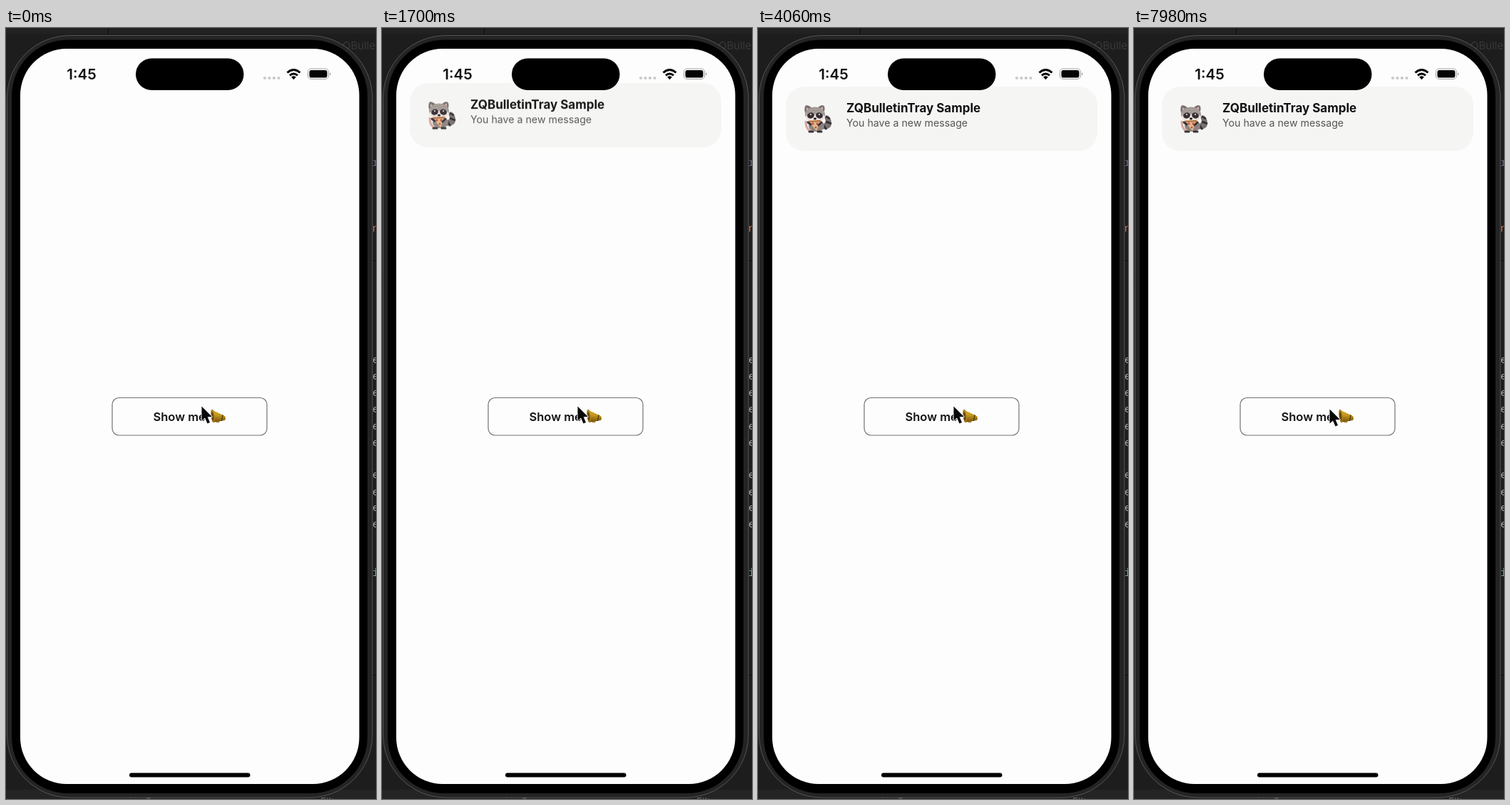
Recreate the animation shown at these times as an HTML page. Size 519x1079 px, loop 8000 ms.

```html
<!DOCTYPE html>
<html lang="en">
<head>
<meta charset="utf-8">
<title>Banner notification</title>
<style>
  html, body { margin: 0; width: 100%; height: 100%; overflow: hidden; background: #1d1d1d; }
  svg { display: block; width: 100vw; height: 100vh; }
  text { font-family: Inter, Roboto, sans-serif; }
  .code text { font: 15px "Noto Sans Mono", "DejaVu Sans Mono", monospace; }
  .bold { font-weight: 600; fill: #111; }

  #banner { animation: drop 8s infinite; }
  @keyframes drop {
    0%, 16.06% {
      transform: translateY(-146px); opacity: 0;
      animation-timing-function: cubic-bezier(.2, .4, .2, 1);
    }
    23.41%, 100% { transform: none; opacity: 1; }
  }

  #cursor { animation: nudge 8s infinite; }
  @keyframes nudge {
    0%, 96% { transform: none; animation-timing-function: ease-in-out; }
    99.5%, 100% { transform: translateY(4px); }
  }
</style>
</head>
<body>
<svg viewBox="0 0 519 1079" preserveAspectRatio="none">
  <defs>
    <clipPath id="screen"><rect x="20" y="29" width="475.500" height="1029" rx="65"/></clipPath>
    <linearGradient id="gold" x1="0" y1="0" x2="0" y2="1">
      <stop offset="0" stop-color="#d9b435"/>
      <stop offset=".45" stop-color="#c3951c"/>
      <stop offset="1" stop-color="#6e4d0c"/>
    </linearGradient>
  </defs>

  <!-- desktop behind the phone -->
  <rect width="519" height="1079" fill="#1d1d1d"/>
  <rect width="519" height="8" fill="#222"/>
  <path d="M143.500 0V9M0 128.500H3M0 352.500H3M514 325.500H519M514 905.500H519" stroke="#0c0c0c"/>
  <rect y="1066" width="519" height="13" fill="#242424"/>
  <text x="472" y="30" font-size="15" fill="#383838">QBulle</text>
  <g class="code" id="code"></g>
  <text x="156" y="1087" font-size="13" fill="#777">swipe 0</text>
  <text x="441" y="1088" font-size="14" fill="#666">Filter</text>

  <!-- phone body -->
  <rect x="1.500" y="10.500" width="512.500" height="1066.500" rx="88" fill="#242424" stroke="#555"/>
  <rect x="8" y="16.500" width="499" height="1054.500" rx="79" fill="#000"/>
  <rect x="20" y="29" width="475.500" height="1029" rx="65" fill="#fdfdfd"/>

  <g clip-path="url(#screen)">
    <g id="banner">
      <rect x="39" y="82" width="437" height="90" rx="26" fill="#f5f5f4"/>

      <!-- raccoon with a slice of pizza -->
      <path d="M88 141Q103 144 103 133Q102 123 96 122Q92 124 95 130Q95 135 87 134Z" fill="#77706f"/>
      <path d="M95 124l6 3M95 131l8 3M92 136l4 6" stroke="#302c30" stroke-width="2.500"/>
      <ellipse cx="82" cy="137" rx="11" ry="8" fill="#8d8380"/>
      <path d="M66 119Q64 109 68 108Q74 109 77 114Z" fill="#77706f"/>
      <path d="M93 117Q95 108 90 108Q85 109 82 114Z" fill="#77706f"/>
      <path d="M68 115l0-4 4 3ZM91 114l0-4-4 3Z" fill="#e0b3a8"/>
      <ellipse cx="80" cy="121" rx="14" ry="10.500" fill="#a39a96"/>
      <path d="M66 124Q74 118 80 121Q87 118 94 124Q90 132 80 131Q70 132 66 124Z" fill="#eee3dc"/>
      <ellipse cx="74" cy="122.500" rx="5" ry="4" fill="#352f34" transform="rotate(-20 74 122.500)"/>
      <ellipse cx="86" cy="122.500" rx="5" ry="4" fill="#352f34" transform="rotate(20 86 122.500)"/>
      <g fill="#fff"><circle cx="74" cy="121" r="1"/><circle cx="86" cy="121" r="1"/></g>
      <ellipse cx="80" cy="127" rx="2" ry="1.400" fill="#19171a"/>
      <path d="M71 131L88 130L82 144Z" fill="#e9b98b"/>
      <path d="M71 131L88 130" stroke="#b77746" stroke-width="2.500"/>
      <g fill="#bd584e"><circle cx="77" cy="134" r="1.700"/><circle cx="83" cy="134" r="1.700"/><circle cx="81" cy="139" r="1.500"/></g>
      <path d="M67 130Q67 143 75 144" fill="none" stroke="#d5a89c" stroke-width="3"/>
      <path d="M70 132l4 3M89 132l-4 4M72 145h5M84 145h5" stroke="#3a3336" stroke-width="3" stroke-linecap="round"/>

      <text class="bold" x="124" y="118" font-size="17" style="font-weight:700">ZQBulletinTray Sample</text>
      <text x="124" y="138.300" font-size="14.200" fill="#555">You have a new message</text>
    </g>

    <!-- status bar -->
    <text class="bold" x="106" y="72" font-size="20.500" text-anchor="middle">1:45</text>
    <path d="M363 70h20" stroke="#c8c8c8" stroke-width="4.200" stroke-linecap="round" stroke-dasharray="0 6.500"/>
    <g fill="none" stroke="#050505" stroke-width="2.900">
      <path d="M394.500 62.500Q403.500 54.500 412.500 62.500"/>
      <path d="M398 66.300Q403.500 61.500 409 66.300"/>
    </g>
    <path d="M400.200 68.700Q403.500 66 406.800 68.700L403.500 72.300Z" fill="#050505"/>
    <rect x="423.500" y="57" width="29" height="14.500" rx="4.500" fill="none" stroke="#a3a3a3"/>
    <rect x="425.500" y="59" width="25" height="10.500" rx="2.800" fill="#050505"/>
    <path d="M454 62Q457 64.300 454 66.600Z" fill="#a3a3a3"/>
  </g>
  <rect x="182" y="42.500" width="151.500" height="44.500" rx="22.250" fill="#000"/>
  <rect x="173" y="1042.500" width="169.500" height="6" rx="3" fill="#000"/>

  <!-- button -->
  <rect x="149" y="517.500" width="217" height="52.500" rx="9.500" fill="#fdfdfd" stroke="#747477" stroke-width="1.200"/>
  <text class="bold" x="206.500" y="549.700" font-size="16.500">Show me</text>
  <path d="M294 549Q297 555 301 548" fill="none" stroke="#9a7416" stroke-width="1.500"/>
  <path d="M288 534L306 542.500Q309.500 545 307 549L290 552Z" fill="url(#gold)"/>
  <ellipse cx="290" cy="543" rx="2.600" ry="9.300" fill="#a87c17" transform="rotate(-7 290 543)"/>
  <ellipse cx="289.700" cy="543.500" rx="1.300" ry="6.500" fill="#5e430d" transform="rotate(-7 290 543)"/>
  <path d="M304 541.500L302.500 550" stroke="#4c3608" stroke-width="1.300"/>

  <g id="cursor">
    <path d="M274.500 529.500V549.500L279 545.500L282.500 553.500L286 552L282.700 544.200L289 544Z"
      fill="#080808" stroke="#fff" stroke-width="1.500" stroke-linejoin="round" paint-order="stroke"/>
  </g>
</svg>
<script>
  // Slivers of editor text along the right edge
  const rows = [464, 487, 510, 533, 557, 580, 625, 649, 671, 694].map(y => ["e", y, "#a5a5a5"]);
  rows.push(["r", 188, "#71618a"], ["n", 280, "#c9714c"], ["i", 762, "#62b5a0"]);
  document.getElementById("code").innerHTML = rows
    .map(([ch, y, fill]) => `<text x="514" y="${y + 5}" fill="${fill}">${ch}</text>`)
    .join("");
</script>
</body>
</html>
```
